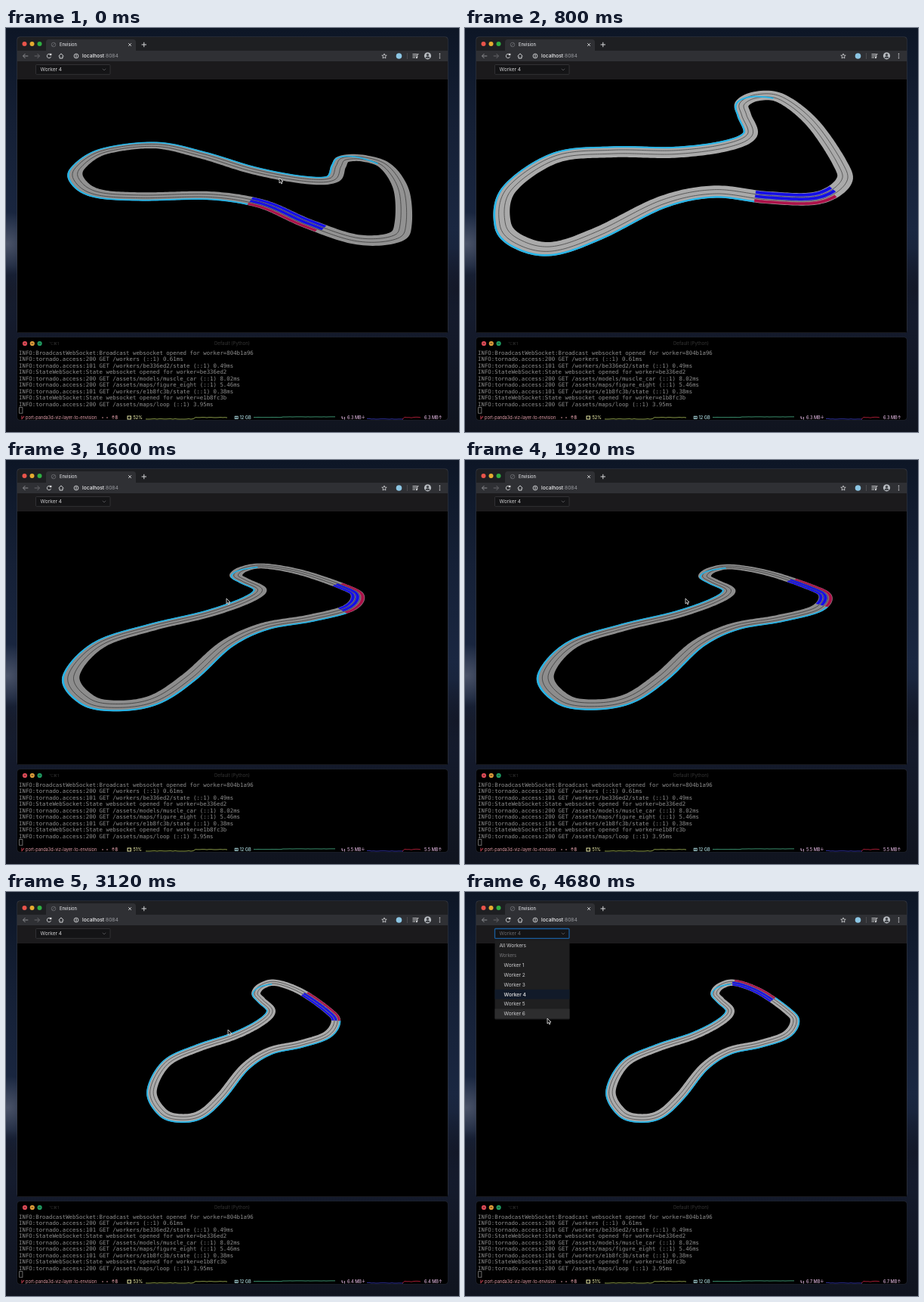
Recreate the animation shown at these times as an HTML page with a canvas. Size 600 px wide and 534 px high, loop 4720 ms.

```html
<!DOCTYPE html>
<html lang="en">
<head>
<meta charset="utf-8">
<title>Envision</title>
<style>
html, body { margin: 0; width: 100%; height: 100%; overflow: hidden; background: #0c1424; }
canvas { display: block; width: 600px; height: 534px; }
</style>
</head>
<body>
<canvas id="stage" width="600" height="534"></canvas>
<script>
const ctx = document.getElementById('stage').getContext('2d');
const LOOP = 4720, STEP = 40;
const SANS = 'Inter, Roboto, sans-serif', MONO = '"DejaVu Sans Mono", monospace';

// Orbit camera poses: time, turn and tilt in degrees, zoom, ground point at the centre.
const FOCAL = 850, CX = 300, CY = 235, REST_TILT = 37;
const CAMERA = [
  [0, 55, 57, 1.64, 40, -11],
  [480, 55, 36, 1.65, 40, -11],
  [800, 24, 38, 1.64, 40, -11],
  [1080, -4, 60, 1.62, 38, -13],
  [1920, -4, 60, 1.56, 12, -15],
  [2600, -4, 60, .93, 4, -5],
  [3080, 0, REST_TILT, 1, 0, 0]];

// Track centre line in driving order, as the resting camera sees it.
const CENTRE = [
  [358,120],[339,124],[331,134],[338,143],[351,157],[338,172],[303,190],[255,206],[213,226],[193,263],
  [207,291],[230,299],[258,294],[285,270],[317,231],[350,210],[390,201],[425,189],[437,171],[427,157],[391,132]];
const CORNER = 18, HALF = 6.5, CAR_LENGTH = 68, TRAIL_START = 7;

// Rear of the car's lanes, measured from the sharp corner.
const DRIVE = [[0, -125], [1900, -21], [3120, 1], [4680, 51]];
const POINTER = [[3360, 294, 182], [3840, 112, 56], [4040, 112, 56], [4560, 109, 167]];
const MENU_OPEN = 3960;
const STATS = [[0, '52', '6.3'], [1480, '51', '5.5'], [2300, '51', '6.4'], [2960, '53', '6.4'], [4040, '51', '6.7']];

const mix = (a, b, k) => a + (b - a) * k;
const radians = deg => deg * Math.PI / 180;

function keyed(rows, t) {
  let i = 0;
  while (i < rows.length - 2 && t >= rows[i + 1][0]) i++;
  const a = rows[i], b = rows[i + 1];
  const k = Math.max(0, Math.min(1, (t - a[0]) / (b[0] - a[0])));
  return a.slice(1).map((v, j) => mix(v, b[j + 1], k));
}

function camera([turn, tilt, zoom, panX, panY]) {
  const cosTurn = Math.cos(radians(turn)), sinTurn = Math.sin(radians(turn));
  const cosTilt = Math.cos(radians(tilt)), sinTilt = Math.sin(radians(tilt));
  return ([gx, gy]) => {
    const x = (gx - panX) * zoom, y = (gy - panY) * zoom;
    const depthY = x * sinTurn + y * cosTurn, depth = 1 - depthY * sinTilt / FOCAL;
    return [CX + (x * cosTurn - y * sinTurn) / depth, CY + depthY * cosTilt / depth];
  };
}

function toGround([px, py]) {
  const slope = Math.sin(radians(REST_TILT)) / FOCAL, y = py - CY;
  const gy = y / (Math.cos(radians(REST_TILT)) + y * slope);
  return [(px - CX) * (1 - gy * slope), gy];
}

function spline([a, b, c, d], u) {
  return .5 * (2*b + (c - a)*u + (2*a - 5*b + 4*c - d)*u*u + (3*b - a - 3*c + d)*u*u*u);
}

// Resample the closed spline at unit steps, with the right-hand normal.
const track = [], marks = [];
{
  const points = CENTRE.map(toGround), n = points.length, fine = 100;
  let last = points[0], need = 0;
  points.forEach((_, i) => {
    marks.push(track.length);
    const p = [-1, 0, 1, 2].map(k => points[(i + k + n) % n]);
    for (let j = 0; j < fine; j++) {
      const at = [0, 1].map(axis => spline(p.map(q => q[axis]), j / fine));
      need -= Math.hypot(at[0] - last[0], at[1] - last[1]);
      last = at;
      if (need <= 0) { track.push({x: at[0], y: at[1]}); need += 1; }
    }
  });
  track.forEach((p, i) => {
    const a = track.at(i - 2), b = track[(i + 2) % track.length];
    const len = Math.hypot(b.x - a.x, b.y - a.y);
    p.nx = -(b.y - a.y) / len;
    p.ny = (b.x - a.x) / len;
  });
}

function onTrack(s, offset) {
  const n = track.length, i = Math.floor(s), k = s - i;
  const a = track[(i + n) % n], b = track[(i + 1 + n) % n];
  return [mix(a.x, b.x, k) + mix(a.nx, b.nx, k) * offset * HALF,
          mix(a.y, b.y, k) + mix(a.ny, b.ny, k) * offset * HALF];
}

function edge(project, from, to, offset) {
  const count = Math.ceil((to - from) / 2);
  return Array.from({length: count + 1}, (_, i) => {
    const s = mix(from, to, i / count);
    return project(onTrack(s, offset(s)));
  });
}

function trace(pts) {
  pts.forEach((p, i) => i ? ctx.lineTo(p[0], p[1]) : ctx.moveTo(p[0], p[1]));
}

function ribbon(project, from, to, centre, half, colour, outline) {
  ctx.beginPath();
  trace([...edge(project, from, to, s => centre(s) - half),
         ...edge(project, from, to, s => centre(s) + half).reverse()]);
  ctx.closePath();
  ctx.fillStyle = ctx.strokeStyle = colour;
  ctx.lineWidth = outline;
  ctx.fill();
  ctx.stroke();
}

function trailOffset(s) {
  const k = Math.min(1, (s - TRAIL_START) / 44);
  return mix(-.5, .87, k * k * (3 - 2 * k));
}

function drawTrack(t) {
  const view = keyed(CAMERA, t), project = camera(view), n = track.length;
  const light = 90 + 102 * Math.cos(radians(view[1]));
  const grey = v => `rgb(${v},${v},${v})`;
  const loop = offset => { trace(edge(project, 0, n, () => offset)); ctx.closePath(); };
  ctx.save();
  ctx.beginPath(); ctx.rect(15, 68, 570, 334); ctx.clip();
  ctx.lineJoin = 'round';

  ctx.beginPath(); loop(-1); loop(1);
  ctx.fillStyle = grey(light);
  ctx.fill('evenodd');
  ctx.beginPath(); loop(-1 / 3); loop(1 / 3);
  ctx.strokeStyle = grey(light * .4); ctx.lineWidth = .8; ctx.stroke();

  const back = marks[CORNER] + keyed(DRIVE, t)[0], front = back + CAR_LENGTH;
  ribbon(project, TRAIL_START, back, trailOffset, .08, '#1db7ee', .8);
  for (const lane of [-.68, -.02]) ribbon(project, back, front, () => lane, .21, '#140ee6', .5);
  ribbon(project, back, front - 3, () => .7, .2, '#ac1048', .5);
  ctx.restore();
}

function box(x, y, w, h, colour) { ctx.fillStyle = colour; ctx.fillRect(x, y, w, h); }

function rounded(x, y, w, h, r, colour) {
  ctx.beginPath(); ctx.roundRect(x, y, w, h, r);
  ctx.fillStyle = colour; ctx.fill();
}

function dot(x, y, r, colour) {
  ctx.beginPath(); ctx.arc(x, y, r, 0, 7);
  ctx.fillStyle = colour; ctx.fill();
}

function line(colour, width, ...pts) {
  ctx.beginPath(); trace(pts);
  ctx.strokeStyle = colour; ctx.lineWidth = width; ctx.stroke();
}

function ring(x, y, r, colour, from = 0, to = 7) {
  ctx.beginPath(); ctx.arc(x, y, r, from, to);
  ctx.strokeStyle = colour; ctx.lineWidth = .9; ctx.stroke();
}

function label(str, x, y, size, colour, weight = 400, family = SANS) {
  ctx.font = `${weight} ${size}px ${family}`;
  ctx.fillStyle = colour;
  ctx.fillText(str, x, y);
}

function glow(x, y, r, colour) {
  const g = ctx.createRadialGradient(x, y, 0, x, y, r);
  g.addColorStop(0, colour);
  g.addColorStop(1, colour + '00');
  box(x - r, y - r, 2 * r, 2 * r, g);
}

function drawDesktop() {
  const sky = ctx.createLinearGradient(0, 0, 0, 534);
  ['#0d1626', '#152036', '#1a2741', '#141a2b', '#10141f'].forEach((c, i) => sky.addColorStop(i / 4, c));
  box(0, 0, 600, 534, sky);
  glow(2, 285, 42, '#4a5368');
  glow(0, 350, 36, '#161b2a');
  glow(598, 345, 55, '#131828');
}

function drawBrowser() {
  const ink = '#d5d6d8', dim = '#66676b';
  rounded(14.5, 11.5, 571, 391.5, 4, '#3a3c42');
  rounded(15, 12, 570, 390.5, 4, '#1e1f22');
  rounded(53, 15, 119, 17, [4, 4, 0, 0], '#2f3034');
  box(15, 30, 570, 14, '#2f3034');
  box(15, 44, 570, 24, '#1b1a1c');
  box(15, 68, 570, 334.5, '#000');
  ['#e9544b', '#e6ab30', '#2fae42'].forEach((c, i) => dot(24.5 + i * 10, 21, 3, c));

  ring(63, 22, 2.8, dim);
  line(dim, .8, [61, 24], [65, 20]);
  label('Envision', 71, 24.4, 5.7, '#dcdde0', 500);
  line(ink, .9, [162.2, 20.2], [166, 24]);
  line(ink, .9, [166, 20.2], [162.2, 24]);
  line(ink, 1, [179.6, 22], [186, 22]);
  line(ink, 1, [182.8, 18.8], [182.8, 25.2]);

  for (const [x, dir, colour] of [[26, -1, '#8c8d91'], [41, 1, dim]]) {
    line(colour, 1, [x - 3.3 * dir, 37], [x + 3.3 * dir, 37]);
    line(colour, 1, [x + .5 * dir, 34], [x + 3.5 * dir, 37], [x + .5 * dir, 40]);
  }
  ring(57, 37, 2.7, ink, .3, 5.5);
  box(57.8, 33.8, 2.6, 2.4, ink);
  line(ink, 1, [69.6, 37.2], [73, 33.9], [76.4, 37.2]);
  line(ink, 1, [71, 37], [71, 40], [75, 40], [75, 37]);
  ring(93, 37, 2.9, ink);
  box(92.5, 35.2, 1, 3.5, ink);
  label('localhost', 101, 39.3, 6.7, '#f0f0f2', 500);
  label(':8084', 101 + ctx.measureText('localhost').width, 39.3, 6.7, '#9a9ba0');

  const star = Array.from({length: 11}, (_, i) => {
    const a = -Math.PI / 2 + i * Math.PI / 5, r = i % 2 ? 1.5 : 3.4;
    return [501 + r * Math.cos(a), 37.3 + r * Math.sin(a)];
  });
  line(ink, .8, ...star);
  dot(520.5, 37, 3.8, '#8cc6e4');
  box(531, 33, .7, 8, '#56575b');
  for (let i = 0; i < 3; i++) box(538.5, 34.2 + i * 2.2, i < 2 ? 6 : 3.5, .9, ink);
  line(ink, .9, [546.5, 34.6], [544.8, 34.6], [544.8, 39]);
  dot(543.9, 39.2, 1.1, ink);
  dot(558.5, 36.8, 4.6, '#b9bdc2');
  dot(558.5, 35.5, 1.7, '#44474c');
  ctx.beginPath(); ctx.arc(558.5, 40.1, 2.9, Math.PI, 0); ctx.fill();
  for (let i = -1; i <= 1; i++) dot(574.5, 37 + i * 2.6, .8, ink);
}

function drawSelect(open) {
  const ink = '#cfcfd1', size = 6.6;
  rounded(39.5, 48.5, 98.5, 12.8, 1, '#141416');
  ctx.strokeStyle = open ? '#1a5c9c' : '#38383b';
  ctx.lineWidth = open ? 1.3 : .8;
  ctx.stroke();
  label('Worker 4', 45.5, 57.2, size, open ? '#69696c' : ink);
  line('#5b5b5f', .8, [127.8, 53.8], [130, 56], [132.2, 53.8]);
  if (!open) return;
  const rowY = i => 86.3 + i * 12.83;
  rounded(39.5, 64, 99, 104.5, 1, '#1f1f20');
  box(39.5, rowY(4) - 8.8, 99, 12.8, '#111a29');
  box(39.5, rowY(6) - 8.8, 99, 12.8, '#2d2d2e');
  label('All Workers', 45.5, 73.3, size, ink);
  label('Workers', 45.5, 86, 5.7, '#7a7a7d');
  for (let i = 1; i <= 6; i++) label('Worker ' + i, 51.5, rowY(i), size, ink, i === 4 ? 600 : 400);
}

const LOG = [
  'INFO:BroadcastWebSocket:Broadcast websocket opened for worker=804b1a96',
  'INFO:tornado.access:200 GET /workers (::1) 0.61ms',
  'INFO:tornado.access:101 GET /workers/be336ed2/state (::1) 0.49ms',
  'INFO:StateWebSocket:State websocket opened for worker=be336ed2',
  'INFO:tornado.access:200 GET /assets/models/muscle_car (::1) 8.02ms',
  'INFO:tornado.access:200 GET /assets/maps/figure_eight (::1) 5.46ms',
  'INFO:tornado.access:101 GET /workers/e1b8fc3b/state (::1) 0.38ms',
  'INFO:StateWebSocket:State websocket opened for worker=e1b8fc3b',
  'INFO:tornado.access:200 GET /assets/maps/loop (::1) 3.95ms'];

// A sparkline that steps up once, with a slight ripple.
function spark(from, to, stepX, low, high, ripple, colour) {
  const pts = [];
  for (let x = from; x <= to; x += 3) pts.push([x, (x < stepX ? low : high) + ripple * Math.sin(x * x)]);
  line(colour, .8, ...pts);
}

function drawStatus(t) {
  const [, cpu, net] = STATS.filter(row => t >= row[0]).pop();
  const rose = '#e3a0ac', lemon = '#e5e6a6', aqua = '#b4e4ea', lilac = '#d9b0d8';
  const note = (str, x, colour, weight = 500) => label(str, x, 516.7, 5.6, colour, weight);
  line('#e0485e', .9, [21, 512.6], [21, 517.4]);
  line('#e0485e', .9, [23.6, 512.8], [23.6, 514.4], [21, 516]);
  note('port-panda3d-viz-layer-to-envision', 26, rose, 400);
  dot(128, 515, .8, rose);
  dot(134, 515, .8, rose);
  note('↑8', 139.5, rose, 600);
  ctx.lineWidth = 1;
  ctx.strokeStyle = lemon; ctx.strokeRect(161, 513, 4.4, 4);
  note(cpu + '%', 168.5, lemon);
  spark(185, 294, 251, 516.8, 514.8, .25, '#a9bd5a');
  ctx.strokeStyle = aqua; ctx.strokeRect(303.2, 513.2, 4, 3.4);
  line(aqua, .8, [305.2, 513], [305.2, 517]);
  note('12 GB', 309.5, aqua);
  spark(328, 436, 367, 514.6, 514, .1, '#49b48a');
  line(lilac, .9, [445, 513], [445, 516], [447, 516]);
  line(lilac, .9, [448.5, 517.5], [448.5, 514]);
  note(net + ' MB↓', 452, lilac);
  spark(478, 526, 482, 516.2, 516.9, .2, '#3c3fc4');
  spark(525, 551, 528, 517, 514.8, .5, '#cc2440');
  note(net + ' MB↑', 554, lilac);
}

function drawTerminal() {
  rounded(14.5, 408.5, 571, 110, 4, '#20242c');
  rounded(15, 409, 570, 109, 4, '#000');
  ['#e24b58', '#e29f3a', '#1f9f63'].forEach((c, i) => {
    const x = 25 + i * 9.8;
    dot(x, 417, 3.1, c);
    box(x - 1.4, 416.6, 2.8, .8, '#231a18');
  });
  label('⌥⌘1', 57, 418.8, 5.4, '#303030');
  ctx.textAlign = 'center';
  label('Default (Python)', 299.5, 418.8, 6.1, '#343434');
  ctx.textAlign = 'left';
  LOG.forEach((row, i) => label(row, 17, 432 + i * 8.44, 7.39, '#8e8e8e', 400, MONO));
  ctx.strokeStyle = '#858585'; ctx.lineWidth = .8;
  ctx.strokeRect(17.6, 501.6, 4.3, 7.6);
}

function pointerAt(t) {
  if (t < 80) return [362, 198];
  if (t >= 1600 && t < 2080) return [292, 183];
  return t >= 2800 ? keyed(POINTER, t) : null;
}

function drawPointer(t) {
  const at = pointerAt(t);
  if (!at) return;
  ctx.save();
  ctx.translate(...at);
  ctx.beginPath();
  trace([[0,0],[0,7],[1.6,5.5],[2.7,8],[3.9,7.4],[2.8,5.1],[5,5]]);
  ctx.closePath();
  ctx.fillStyle = '#111'; ctx.fill();
  ctx.strokeStyle = '#e8e8e8'; ctx.lineWidth = .8; ctx.stroke();
  ctx.restore();
}

const start = performance.now();
function tick() {
  const t = Math.floor((performance.now() - start) % LOOP / STEP) * STEP;
  drawDesktop();
  drawBrowser();
  drawTrack(t);
  drawSelect(t >= MENU_OPEN);
  drawTerminal();
  drawStatus(t);
  drawPointer(t);
  requestAnimationFrame(tick);
}
tick();
</script>
</body>
</html>
```
